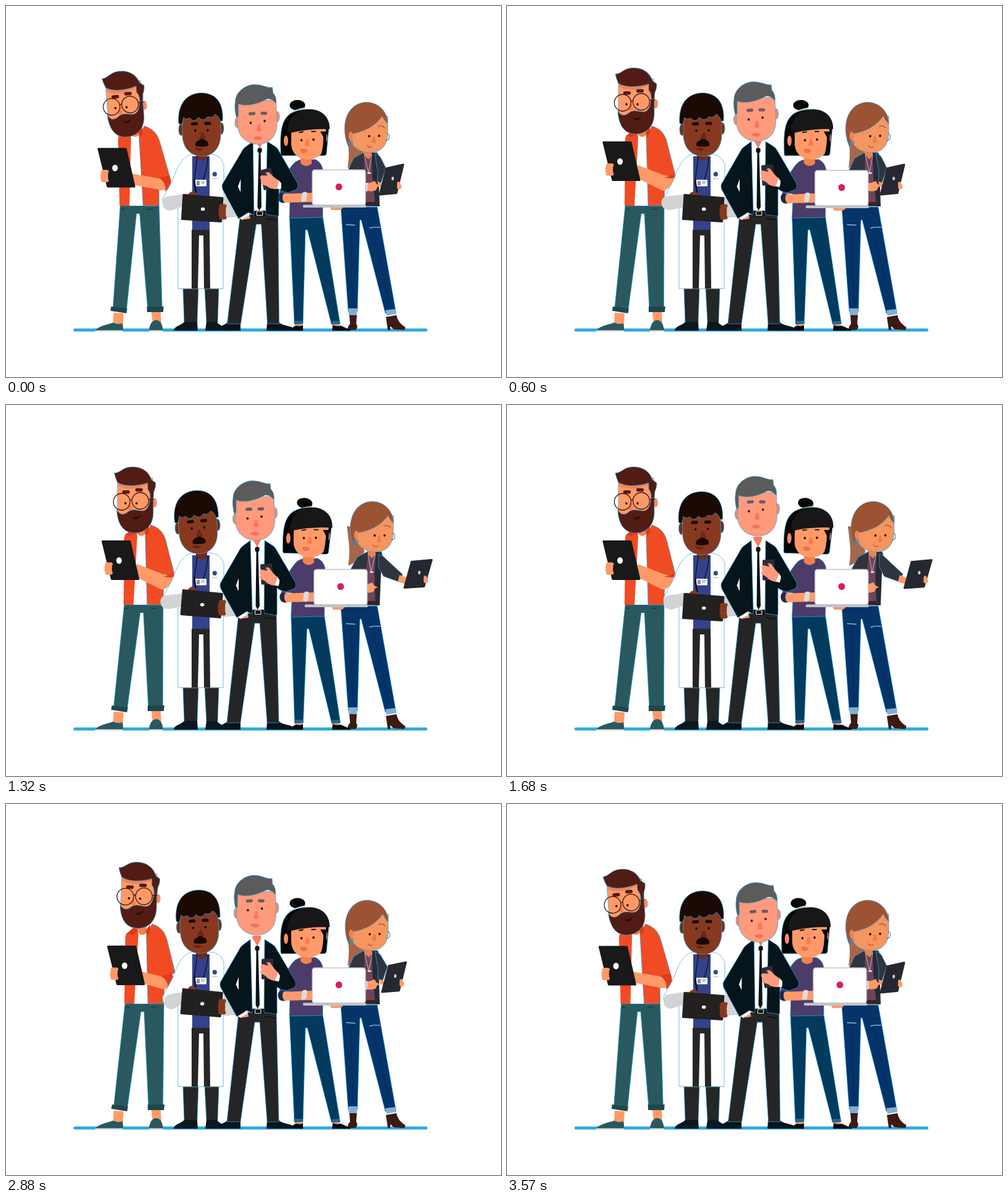
An HTML page that plays this animation: 800x600 px, repeating every 3.6 s.

```html
<!DOCTYPE html>
<html lang="en">
<head>
<meta charset="utf-8">
<title>Team</title>
<style>
html, body { margin: 0; width: 100%; height: 100%; overflow: hidden; background: #fff; }
svg { display: block; width: 800px; height: 600px; }
.o { stroke: #29abe2; stroke-width: .7; }
.r { stroke-linejoin: round; stroke-width: 3; }
</style>
</head>
<body>
<svg id="stage" viewBox="0 0 800 600"></svg>
<script>
const LOOP = 3600;
const skin = '#ff9a68', pink = '#ff9a7c', brown = '#87391f', tan = '#f5955f';
const beard = '#521c15', orange = '#f14b23', teal = '#2a585f', ink = '#06141b';

// Markup helpers
const path = (d, fill, more = '') => `<path d="${d}" fill="${fill}" ${more}/>`;
const line = (d, color, w = 1) => `<path d="${d}" fill="none" stroke="${color}" stroke-width="${w}" stroke-linecap="round"/>`;
const oval = (x, y, rx, ry, fill, more = '') => `<ellipse cx="${x}" cy="${y}" rx="${rx}" ry="${ry}" fill="${fill}" ${more}/>`;
const box = (x, y, w, h, r, fill, more = '') => `<rect x="${x}" y="${y}" width="${w}" height="${h}" rx="${r}" fill="${fill}" ${more}/>`;
const group = (id, ...parts) => `<g id="${id}">${parts.join('')}</g>`;
const edge = 'class="o"';
const slab = (d, fill, id = '') => path(d, fill, `id="${id}" class="r" stroke="${fill}"`);
const eyes = (x1, y1, x2, y2, fill = '#2a0f0a') => oval(x1, y1, 1.8, 1.9, fill) + oval(x2, y2, 1.8, 1.9, fill);
const fingers = (x, y, w, n, fill) => Array.from({ length: n }, (_, i) =>
  box(x + (i === 0 || i === n - 1 ? 1 : 0), y + i * 4.7, w, 6, 3, fill)).join('');

const bearded = () => [
  group('aBody',
    path('M191 323H254L253.5 490H230L222 336H217L196 491L174 488Z', teal, edge),
    line('M192 329L198 328.5M234 329L243 328.5', '#173d43', 1.4),
    path('M171 486L197 489.5L195.5 497L170 493Z', '#1d474d'),
    path('M229 486H256L255 495H229Z', '#1d474d'),
    path('M207 205H228L230 323H206Z', '#fff'),
    path('M211 196H225V209Q218 215 212 208Z', '#f5814f'),
    path('M190 323L191 240C191 222 190 213 193 209L211 200L212 214L206 323Z', orange),
    path('M225 212L234 194C250 199 256 209 259 222L272 273L255 279L254 323H228Z', orange, edge),
    path('M194 209L206 198L211 207L201 212Z', '#d93b17'),
    path('M224 204L231 195L231 206L226 213Z', '#d93b17')),
  path('M174 496L190 497L189 515H173Z', skin),
  path('M235 495H250L251 513H237Z', skin),
  path('M144 525C150 517 163 516 173 512Q181 516 188 513Q190 519 189 525Z', teal),
  path('M231 525C232 515 236 508 243 508C250 508 253 516 254 525Z', teal),
  box(144, 524.5, 45, 2.5, 1, '#dfe7ea'), box(231, 524.5, 23, 2.5, 1, '#dfe7ea'),
  path('', skin, 'id="aArm"'), path('', '#de3d19', 'id="aCuff"'),
  group('aPad',
    slab('M156 220.500L200 220.500L214 281.500L171 281.500Z', '#191919'),
    oval(182.700, 251.500, 4.5, 5.2, '#fff'),
    box(164, 259, 7, 14, 3, skin), fingers(159, 254.500, 12.5, 4, skin)),
  group('aHead',
    path('M180 118H237V170C236 190 222 200 208 200C192 200 181 190 180 172Z', skin, edge),
    path('M181 124Q200 138 234 122L234 126Q202 142 181 131Z', '#ef845a'),
    oval(240, 158, 4, 7.500, '#fb8b63'),
    path('M179 169C184 179 191 178 198 172C206 167 212 171 219 171C228 172 232 163 233 148H238V174C238 195 225 207 208 207C190 207 180 193 179 169Z', beard, edge),
    path('M204 181Q211 183 217 178Q216 186 206 185Z', '#300f0a'),
    path('M175 110C184 110 188 102 199 100.500C217 98 231 107 235 121L242 126Q242 134 239 140L238 151H233Q234 142 229 136L229 126C217 130 194 134 180 125Q177 119 175 110Z', beard, edge),
    box(188, 138, 12, 5.500, 2.200, beard), box(209, 134.500, 12, 5.500, 2.200, beard),
    path('M200 156L204 167Q200 172 196 168Z', '#ff7a48'),
    eyes(193, 159, 211, 159),
    `<g fill="none" stroke="#41150f" stroke-width="1.3"><circle cx="187" cy="156.500" r="13.500"/><circle cx="217" cy="155" r="13.500"/><path d="M200 154.500Q202 152.500 204 154M230 153L239 152"/></g>`)
].join('');

const doctor = () => [
  path('M286 456H311L309 512H288ZM321 456H344L342 512H324Z', '#262626', edge),
  path('M271 525C272 517 283 517 288 511H309L310 525Z', '#0a1820'),
  path('M322 525L324 511H341C344 517 353 516 354 525Z', '#0a1820'),
  path('M303 239C285 241 276 262 270 280L253 312Q252 322 262 328L278 326V457H351V342L372 340L366 322L352 305V256Q347 240 328 239Z', '#fff', edge),
  line('M279 457H351', '#bfc7cc', .8),
  path('M352 305L366 322L372 339L350 343Z', '#d3d3d5'),
  path('M301 243H329V362H301Z', '#33428b'),
  path('M300 362H329L330 457H320L319 371H312L310 457H300Z', '#262626'),
  path('M307 232H325V246Q316 254 307 246Z', '#6f2b19'),
  line('M309 244L304 283M326 244Q326 262 318 283', '#0d0d16', 1.2),
  box(306, 281, 18, 10.500, 1, '#fff'), box(308, 283, 5, 7, 1, '#8a8f99'),
  line('M315.500 284.500H321.500M315.500 287H320', '#777d88', 1),
  oval(337.300, 272, 3.600, 3.800, '#2f4a8f'), box(333, 278, 9, 2.200, 1, '#d5d8df'),
  path('', '#d3d3d5', 'id="bArm"'),
  group('bPad',
    line('M304.500 284L307 301', '#101010', 2.500),
    path('M294 306Q297 299 304 300L311 307Z', brown),
    slab('M287 305.500L350 310.500L347.500 348.500L284.500 344.500Z', '#222120'),
    oval(318.200, 328.500, 3.300, 2.700, '#fff'),
    box(347, 323, 8, 19, 3, brown), fingers(343.500, 320.500, 12, 5, brown)),
  group('bHead',
    oval(283, 200, 4, 9.500, '#742d1a', edge), oval(348, 198, 4, 9.500, '#742d1a', edge),
    path('M285 168H347V208C347 230 334 243 317 243C299 243 285 230 285 208Z', brown, edge),
    path('M279 190C277 160 290 141 316 140.500C342 141 352 160 350 186H346Q344 178 338 175Q334 182 326 179Q319 188 311 180Q304 190 297 181Q291 185 287 180L284 192Z', '#1b0904', edge),
    box(299, 188, 11, 5, 2.200, '#1b0904', 'transform="rotate(-4 304 190)"'), box(320.500, 187.500, 11, 5, 2.200, '#1b0904'),
    eyes(306, 201.500, 326, 201, '#1b0904'),
    path('M316 205H320L323 215Q317 219 312 215Z', '#6c2917'),
    path('M306 226Q305 219 312 217Q317 213 322 217Q328 219 327 226Q317 229 306 226Z', '#1b0904'),
    path('M305 229Q312 229 319 231Q316 236 308 233Z', '#662414'))
].join('');

const suit = () => [
  path('M342 525C344 516 354 517 358 511H379V525Z', ink),
  path('M421 525L422 511H441C447 519 466 516 468 525Z', ink),
  group('cBody',
    path('M376 337H437L441 514H422L410 353H402L379 514H357Z', '#252525', edge),
    path('M394 219H419L417 332H398Z', '#fff'),
    path('M398 331H417L418 339H397Z', '#111'),
    box(402.500, 332, 9.500, 6.500, 1, '#111', 'stroke="#dfe3e6" stroke-width="1.200"'),
    path('M398 213H412V224L406 231L399 224Z', '#fa7d5c'),
    path('M395 219L399 218L406 230L400 233ZM419 219L412 218L406 230L412 233Z', '#fff'),
    oval(406, 233.500, 3.700, 4.200, ink),
    path('M404.500 236H407.500L410 325L406.500 331L403.500 325Z', ink),
    path('M395 219L384 227Q379 230 376 237L346.500 288Q345 292 347 297L373 344L389 334L398 338V331Z', ink, edge),
    path('M376 280L371.500 292L376 301Z', '#fff'),
    path('M375 343L389 334.500L391 339L379 346Z', '#fff'), path('M377 346L391 339L392 344Z', pink),
    path('M418 219L429 226Q435 229 438 236L468 287Q470 293 466 297L453 302Q444 301 438 296L438 338L437 340L417 337Z', ink, edge),
    line('M419 344L435 346', '#0d0d0d', 1.300)),
  group('cHand',
    slab('M412.500 259L428.500 257.500L431 288L414 289Z', '#2b2d35'),
    oval(421, 264, 1.800, 1.800, '#777b88'),
    path('M432 291L438 277L442 283Q442 290 440 293Z', '#fff'),
    path('M410 271Q409 267 413 266L422 268Q420 261 425 263L432 272L439 279L434 292Q424 291 419 285L411 281Q408 278 412 276Z', pink)),
  group('cHead',
    oval(370.500, 184, 4, 8.500, '#fb8768', edge), oval(435, 174.500, 3.500, 8.500, '#fb8768', edge),
    path('M371 148H433L434.500 188C434 207 421 219 404 219C387 219 372 208 371 190Z', pink, edge),
    path('M369 176C366 165 366 155 367 151C367 136 381 124 396 122.500C412 122 419 129 427 127L428 136Q434 142 433 153Q425 144 418 146C405 153 388 159 372 154V174Z', '#5b5b5b', edge),
    group('cFace',
      box(387, 166, 11, 5, 2.200, '#626063', 'transform="rotate(-4 392 168)"'), box(406.500, 165.500, 10.500, 5, 2.200, '#626063'),
      eyes(390.500, 183.500, 413, 180.500, '#2a1a18'),
      path('M402 186H406L408 196Q404 199 400 196Z', '#ff7456'),
      path('M395 207Q402 203 409 207Q407 214 397 210Z', '#f4705a')))
].join('');

const laptopWoman = () => [
  path('M467 513H479V520H467ZM527 513H539V520H528Z', skin),
  path('M460 525Q464 517 470 517Q476 519 480 516V525ZM527 525L528 516Q534 519 541 517L557 524V525Z', '#080808'),
  group('dBody',
    path('M458 340L512 341L540 514L526 515L487 362H484L480 514H466Z', '#033a5e', edge),
    path('M465.500 509H480V514L466 515ZM525 510L539 509L540 514L526 515Z', '#236596'),
    path('M474 249L500 248Q510 253 512 264L512 342L458 343L459 304L449 303L441 306Q448 275 462 258Q467 251 474 249Z', '#4b3c69', edge),
    path('M476 238H494V255Q484 263 476 254Z', '#f2814f')),
  group('dPad',
    path('M441 304Q447 301 452 304L452 318Q445 320 441 315Q438 309 441 304Z', '#1f2549'),
    path('M448 304L495 302V317L450 318Q445 312 448 304Z', skin),
    path('M479 302Q483 299 487 302L485 315Q481 318 477 315Z', '#dcdce2'),
    path('M523 325H545Q543 330 537 330H526Z', skin),
    box(495, 265, 86, 57, 4, '#fff', 'stroke="#c3c4cb" stroke-width="1.300"'),
    box(480, 321.500, 102, 4.500, 1.500, '#c2c3c8'),
    oval(538, 292.500, 5.400, 5.600, '#d81e5b')),
  group('dHead',
    group('dBun', oval(471, 160.500, 12.500, 8.500, '#070707'),
      path('M457 174Q470 166 483 164L484 169L459 179Z', '#d2d4d8')),
    path('M444 239C443 205 444 185 460 174C480 162 515 165 522 195L518 238Q518 242 513 242H448Q444 243 444 239Z', '#070707', edge),
    oval(452.500, 218, 3.500, 8.500, '#fb8b5c'), oval(517, 213, 2.500, 7, '#fb8b5c'),
    path('M461 195H517V220C516 237 504 248 488 248C472 248 461 238 461 222Z', skin),
    path('M508 203H518L517 237Q517 242 509 241Q513 228 513 212Z', '#070707'),
    path('M455 203C455 181 470 167 491 167C512 167 524 182 523 199Q490 198 461 205Z', '#171717'),
    line('M474 204.500L480 203.500M494 203L500 203', '#171717', 1.800),
    eyes(477.500, 217, 497, 216),
    path('M486 215H489L491 225Q487 228 483 225Z', '#ff7a48'),
    path('M475 232Q482 229 488 233Q485 240 477 237Z', '#f06f52'))
].join('');

const tabletWoman = () => [
  path('M541 325H600L630 494L613 497L574 346H572L568 494H553Z', '#05346a', edge),
  line('M550 353.500L564 354.500M588 359Q596 357 604 358', '#8ab8dc', 1.400),
  line('M557 358L561 484M592 362L621 484', '#042952', .8),
  path('M553 489H568L567 500H554ZM613 492L630 490L631 498L615 501Z', '#7fb0d3'),
  path('M555 500H567L566 514Q570 519 565 524H552Q552 518 556 514Z', '#3c1a11'),
  path('M614 503L631 500Q633 512 645 519Q646 524 642 524L627 523L621 518V524H617Z', '#3c1a11'),
  group('eBack', path('M550 198C553 225 556 236 552 262Q570 255 578 240L574 200Z', '#a7664a')),
  group('eBody',
    path('M562 246L578 237L600 237Q605 246 602 262L600 324H572L552 267Z', '#30343f', edge),
    path('M579 238H591L597 318H577Z', '#6d4459'),
    path('M577 230H592V240L586 248Q579 243 577 236Z', '#ec8450'),
    path('M591 237L601 239L604 324H597L592 275Z', '#262a35'),
    line('M579 241L586 270L591 241', '#d8c9d2', .8), box(584, 269, 6, 2.500, 1, '#e5dce2')),
  path('M573 317H597V323H574Z', '#481b20'),
  path('', '#30343f', 'id="eSleeve" class="o"'), path('', skin, 'id="eWrist"'),
  slab('', '#262831', 'ePad'),
  group('eGrip', oval(625, 279, 2, 3, '#c9cbd2'),
    box(632, 284, 5, 8, 2.500, skin), box(632, 288, 7, 8, 2.500, skin)),
  group('eHand', path('M580 287L588 286L596 283L599 288L605 291L600 293L598 298Q588 302 580 297Z', skin),
    path('M580 286H585L584 300H580Z', '#dadbe1')),
  group('eHead',
    path('M555 178H617L617 206C617 225 606 237 589 237C569 237 555 225 555 206Z', tan, edge),
    path('M548 208C544 179 558 156 583 155.500C604 156 617 173 617 190Q613 188 608 178C598 193 580 204 557 207L555 231Q549 219 548 208Z', '#9b5333', edge),
    oval(557, 210, 3.500, 7, '#ec8357'),
    line('M602 195Q607 192 612 197', '#9b5333', 1.300),
    line('M556 217A3.500 3.500 0 1 0 558 217M616 206A4.500 5.500 0 1 1 614 217', '#4b86b0', 1.200),
    eyes(587, 210.500, 603, 210),
    path('M593 211H596L598 220Q594 223 591 220Z', '#f07950'),
    line('M584 226Q587 230 592 228', '#c9563e', 1.400))
].join('');

const stage = document.getElementById('stage');
stage.innerHTML = line('M111.500 524H678.500', '#2fa8df', 5) +
  tabletWoman() + laptopWoman() + bearded() + doctor() + suit();

// Timing: each list holds [time, pose position] pairs
const ease = u => u * u * (3 - 2 * u);
function at(keys, t) {
  let [t0, v0] = keys[0];
  for (const [t1, v1] of keys) {
    if (t < t1) return v0 + (v1 - v0) * ease((t - t0) / (t1 - t0));
    [t0, v0] = [t1, v1];
  }
  return v0;
}
const NUM = /-?\d+(\.\d+)?/g;
function mix(a, b, u) {
  const to = b.match(NUM);
  let i = 0;
  return a.replace(NUM, n => (+n + (to[i++] - n) * u).toFixed(3));
}
const lean = (k, y) => `matrix(1 0 ${(-k).toFixed(4)} 1 ${(k * y).toFixed(4)} 0)`;
const move = (x, y, r = 0, cx = 0, cy = 0) => `translate(${x} ${y}) rotate(${r} ${cx} ${cy})`;

const aKeys = [[0, 0], [60, 0], [540, 1], [1700, 1], [2120, 2], [3200, 2], [3540, 3]];
const bHeadKeys = [[0, 0], [1000, 0], [1260, 1], [1420, 1], [1720, .2], [2200, 0], [2560, 0], [2860, .6], [3060, .6], [3400, 0]];
const bPadKeys = [[0, 0], [1000, 0], [1260, 1], [1400, 1], [1660, 0], [2560, 0], [2840, 1], [3060, 1], [3400, 0]];
const bArmKeys = [[0, 0], [60, 0], [540, 1], [1400, 1], [1680, 0], [2560, 0], [2840, -1], [3060, -1], [3400, 0]];
const cKeys = [[0, 0], [60, 0], [540, 1], [1340, 1], [1660, 2], [3200, 2], [3540, 3]];
const dKeys = [[0, 0], [60, 0], [540, 1], [940, 1], [1260, 2], [2460, 2], [2840, 3]];
const eKeys = [[0, 0], [1040, 0], [1300, 1], [1680, .96], [2220, .9], [2560, .87], [2910, .08], [3200, 0]];

// Poses repeat the first one at the end so that the cycle closes
const cycle = (...p) => [...p, p[0]];
const tracks = [
  ['aBody', aKeys, cycle(lean(-.032, 525), lean(0, 525), lean(.006, 525))],
  ['aPad', aKeys, cycle(move(-6.5, 10.5), move(0, 0), move(9, 10))],
  ['aHead', aKeys, cycle(move(-14.5, 5, -4.5, 207, 180), move(0, 0, 0, 207, 180), move(5, -6, 2, 207, 180))],
  ['aArm', aKeys, cycle(
    'M203 271L248 279Q262 276 266 284Q264 298 252 298L205 289Z',
    'M211 257L252 273Q268 276 270 280Q262 300 250 298L212 279Z',
    'M219 271L252 279Q267 276 270 283Q266 301 252 299L221 290Z')],
  ['aCuff', aKeys, cycle(
    'M247 278L264 273Q269 285 265 293L257 300Q260 286 247 278Z',
    'M254 278L271 272Q272 275 271 278L266 279Q261 278 254 278Z',
    'M251 279L268 273Q273 285 267 295L261 301Q264 286 251 279Z')],
  ['bHead', bHeadKeys, [move(0, 0, 0, 317, 230), move(-4, -2.5, -3.5, 317, 230)]],
  ['bPad', bPadKeys, [move(0, 0, 0, 318, 328), move(-1, -5.5, 1, 318, 328)]],
  ['bArm', bArmKeys, [
    'M260 308L301 302L305 308L284 325L266 331Q252 331 253 316Q254 310 260 308Z',
    'M257 308L301 303L305 308L284 326L263 330Q249 330 249.500 316Q251 310 257 308Z']],
  ['cBody', cKeys, cycle(lean(.0135, 525), lean(0, 525), lean(0, 525))],
  ['cHand', cKeys, cycle(move(2, 6, -9, 423, 278), move(0, 0, 0, 423, 278), move(1, -6.5, 3, 423, 278))],
  ['cHead', cKeys, cycle(move(3.5, 4.5, 0, 404, 190), move(0, 0, 0, 404, 190), move(1.8, -7, 1, 404, 190))],
  ['cFace', cKeys, cycle(move(1.5, 1), move(0, 0), move(-1.5, -4.5))],
  ['dBody', dKeys, cycle(lean(0, 525), lean(.0135, 525), lean(.0135, 525))],
  ['dPad', dKeys, cycle(move(0, 0), move(2.8, 1), move(2.8, 1))],
  ['dHead', dKeys, cycle(move(0, 0, 0, 488, 230), move(4, 0, 0, 488, 230), move(3.5, -1.5, 1.5, 488, 230))],
  ['dBun', dKeys, cycle(move(0, 0, 0, 471, 165), move(0, 0, 0, 471, 165), move(6, 0, 5, 471, 165))],
  ['eBody', eKeys, [lean(0, 323), lean(.075, 323)]],
  ['eBack', eKeys, [move(0, 0), move(1, -2)]],
  ['eHead', eKeys, [move(0, 0, 0, 587, 230), move(8.5, .5, 1, 587, 230)]],
  ['eHand', eKeys, [move(0, 0), move(-4, 4)]],
  ['eGrip', eKeys, [move(0, 0), move(43, -8)]],
  ['ePad', eKeys, ['M615 262.500L642 256.500L631 302.500L604 305Z', 'M655.500 253.500L688 250.500L675.500 293.500L644 295.500Z']],
  ['eSleeve', eKeys, ['M596 239Q604 240 607 248L614 262L606 286L600 284L601 268Z', 'M602 241Q609 243 613 248L641 274L635 286L610 277L602 262Z']],
  ['eWrist', eKeys, ['M600 284L606 286L608 293L602 292Z', 'M636 275L648 279L648 290L633 286Z']]
].map(([id, keys, poses]) => ({
  node: document.getElementById(id),
  attr: poses[0][0] === 'M' ? 'd' : 'transform',
  keys, poses
}));

function draw(t) {
  for (const { node, attr, keys, poses } of tracks) {
    const v = at(keys, t);
    const i = Math.max(0, Math.min(poses.length - 2, Math.floor(v)));
    node.setAttribute(attr, mix(poses[i], poses[i + 1], v - i));
  }
}

const start = performance.now();
function tick() {
  draw((performance.now() - start) % LOOP);
  requestAnimationFrame(tick);
}
draw(0);
requestAnimationFrame(tick);
</script>
</body>
</html>
```
